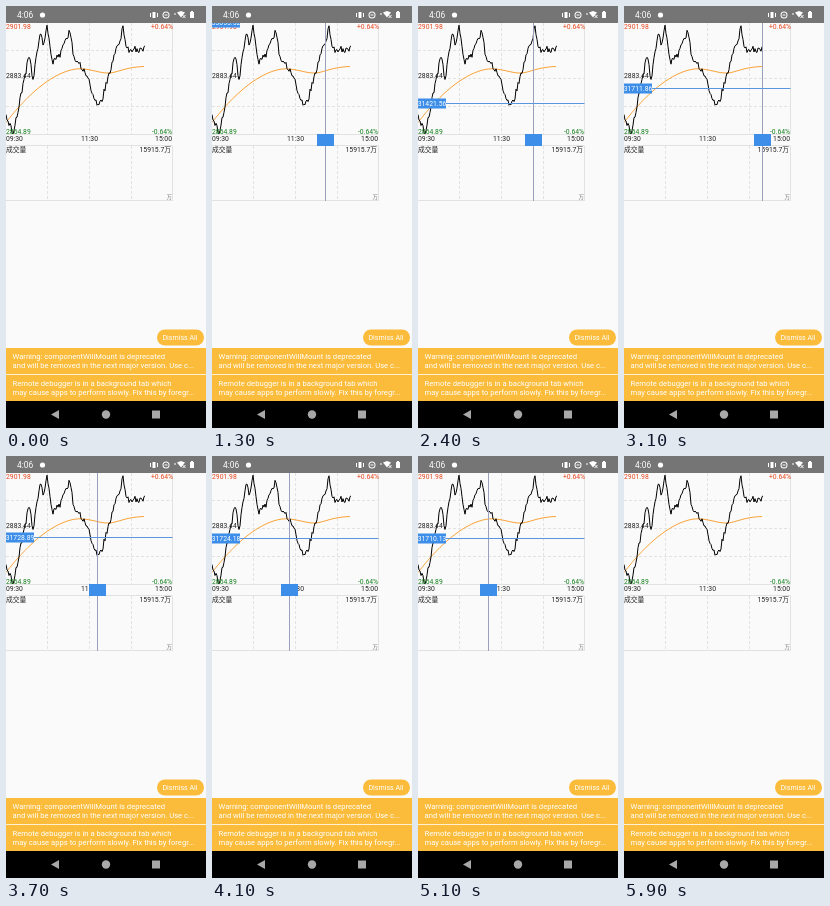
Recreate the animation shown at these times as an HTML page with a canvas. Size 200 by 422 pixels, loop 6000 ms.

```html
<!DOCTYPE html>
<html lang="en">
<head>
<meta charset="utf-8">
<title>Intraday chart</title>
<style>
html, body { margin: 0; width: 100%; height: 100%; overflow: hidden; background: #fafafa; }
canvas { display: block; width: 200px; height: 422px; }
</style>
</head>
<body>
<canvas id="stage" width="200" height="422"></canvas>
<script>
const ctx = document.getElementById('stage').getContext('2d');
const LOOP = 6000, STEP = 100, SHOW = 1300, HIDE = 5900;
const RIGHT = 166.5, TOP = 17, BASE = 128, BOTTOM = 195, END = 139;
const BLUE = '#3d8ee9', AMBER = '#fbbc3b', GRID = '#e2e2e2', INK = '#222';
const FONT = 'Roboto, "Noto Sans CJK SC", "Noto Sans CJK", sans-serif';

// Finger stops: time, x, price
const stops = [
  [1800, 113, 33055.52], [2400, 115, 31421.56], [3100, 138, 31711.86],
  [3700, 91, 31728.89], [4500, 64, 31719.47], [5600, 75, 31702.35]
];

// Main swings of the price line
const swings = [
  [0, 112], [7, 126], [13, 100], [23, 50], [27, 74], [34, 25], [37, 40], [41, 18],
  [46, 57], [54, 49], [64, 25], [68, 54], [78, 63], [91, 97], [95, 97], [102, 71],
  [109, 48], [117, 23], [121, 44], [END, 43]
];

const clamp = (v, lo, hi) => Math.min(hi, Math.max(lo, v));

// Linear value of one column of a key list at position p
function along(keys, p, col = 1) {
  p = clamp(p, keys[0][0], keys[keys.length - 1][0]);
  const i = Math.max(1, keys.findIndex(key => key[0] >= p));
  const a = keys[i - 1], b = keys[i];
  return a[col] + (b[col] - a[col]) * (p - a[0]) / (b[0] - a[0]);
}

function curve(step, f) {
  const points = [];
  for (let x = 0; x <= END; x += step) points.push([x, f(x)]);
  return points;
}

let seed = 19;
const random = () => (seed = (seed * 16807) % 2147483647) / 2147483647;
const price = curve(1, x => clamp(along(swings, x) + (random() - 0.5) * 7, TOP + 0.5, BASE));
const average = curve(2, x => {
  const fall = 54 * Math.max(0, 1 - x / 75) ** 1.8;
  const bump = 4.5 * Math.exp(-(((x - 102) / 17) ** 2));
  return 62.5 + fall + bump - 2 * clamp((x - 105) / 30, 0, 1);
});

function rect(x, y, w, h, color) {
  ctx.fillStyle = color;
  ctx.fillRect(x, y, w, h);
}

function trace(points) {
  ctx.beginPath();
  points.forEach(([x, y]) => ctx.lineTo(x, y));
}

function line(points, color, dash = []) {
  trace(points);
  ctx.setLineDash(dash);
  ctx.strokeStyle = color;
  ctx.stroke();
}

function shape(points, color) {
  trace(points);
  ctx.fillStyle = color;
  ctx.fill();
}

const across = (y, color, dash) => line([[0, y], [RIGHT, y]], color, dash);
const down = (x, y0, y1, color, dash) => line([[x, y0], [x, y1]], color, dash);

function circle(x, y, r, color) {
  ctx.beginPath();
  ctx.arc(x, y, r, 0, Math.PI * 2);
  ctx.fillStyle = color;
  ctx.fill();
}

function label(str, x, y, color = INK, align = 'left', size = 6.8) {
  ctx.font = `${size}px ${FONT}`;
  ctx.textAlign = align;
  ctx.fillStyle = color;
  ctx.fillText(str, x, y);
}

function statusBar() {
  const white = '#fff', bar = '#757575';
  rect(0, 0, 200, TOP, bar);
  label('4:06', 11, 12, white, 'left', 8.4);
  circle(36.5, 9, 2.6, white);
  // Vibrate, do not disturb, network, battery
  rect(146.5, 6, 3, 6, white);
  for (const x of [144.5, 151.5]) down(x, 7, 11, white);
  circle(160, 9, 3.5, white);
  circle(160, 9, 2.5, bar);
  rect(158.5, 8.5, 3, 1, white);
  rect(168.5, 7, 1, 2, white);
  shape([[171, 6.5], [175, 5], [179, 6.5], [175, 11.5]], white);
  line([[176.5, 9], [179.5, 12]], white);
  line([[179.5, 9], [176.5, 12]], white);
  rect(184, 6, 4, 6, white);
  rect(185, 5, 2, 1, white);
}

function chart() {
  const dash = [3, 2], red = '#e5481f', green = '#15801f';
  for (let i = 1; i < 4; i++) {
    const x = 42 * i - 0.5;
    down(x, TOP, BASE, GRID, dash);
    down(x, 140, BOTTOM, GRID, dash);
    across(28 * i + 16.5, GRID, dash);
  }
  for (const y of [BASE + 0.5, 139.5, BOTTOM - 0.5]) across(y, GRID);
  down(RIGHT, TOP, BASE, GRID);
  down(RIGHT, 140, BOTTOM, GRID);
  line(average, '#f9a43a');
  line(price, '#000');
  label('2901.98', 0, 23.2, red);
  label('+0.64%', 167, 23.2, red, 'right');
  label('2883.44', 0, 72);
  label('2864.89', 0, 127.7, green);
  label('-0.64%', 166, 127.7, green, 'right');
  label('09:30', 0, 134.7);
  label('11:30', 83.5, 134.7, INK, 'center');
  label('15:00', 166, 134.7, INK, 'right');
  label('成交量', 0, 146);
  label('15915.7万', 165, 146, INK, 'right');
  label('万', 166, 193, '#777', 'right', 5.5);
}

function warnings() {
  ctx.beginPath();
  ctx.roundRect(151, 323.5, 47, 16, 8);
  ctx.fillStyle = AMBER;
  ctx.fill();
  label('Dismiss All', 174, 334, '#fff', 'center', 7.1);
  rect(0, 342, 200, 53, AMBER);
  rect(0, 368, 200, 1, '#fff0d0');
  [
    ['Warning: componentWillMount is deprecated',
      'and will be removed in the next major version. Use c...'],
    ['Remote debugger is in a background tab which',
      'may cause apps to perform slowly. Fix this by foregr...']
  ].forEach((rows, i) => rows.forEach((row, j) =>
    label(row, 6.5, 352.5 + 27 * i + 9.8 * j, '#fff', 'left', 7.65)));
}

function navBar() {
  const grey = '#a8a8a8';
  rect(0, 395, 200, 27, '#000');
  shape([[45, 408.5], [53, 404], [53, 413]], grey);
  circle(100, 408.5, 4.2, grey);
  rect(146, 404.5, 8, 8, grey);
}

function crosshair(t) {
  const x = Math.floor(along(stops, t)) + 0.5;
  const value = along(stops, t, 2);
  const y = Math.round(82.3 - (value - 31711.86) / 20.4) + 0.5;
  down(x, TOP, BOTTOM, '#9a9fbd');
  across(y, '#5b95de');
  rect(0, y - 5, 28, 10, BLUE);
  label(value.toFixed(2), 14, y + 2.4, '#fff', 'center');
  rect(x - 8.5, BASE, 17, 12, BLUE);
}

function draw(now) {
  const t = Math.floor((now % LOOP) / STEP) * STEP;
  rect(0, 0, 200, 422, '#fafafa');
  chart();
  if (t >= SHOW && t < HIDE) crosshair(t);
  statusBar();
  warnings();
  navBar();
}

const start = performance.now();
function tick() {
  draw(performance.now() - start);
  requestAnimationFrame(tick);
}
tick();
</script>
</body>
</html>
```
